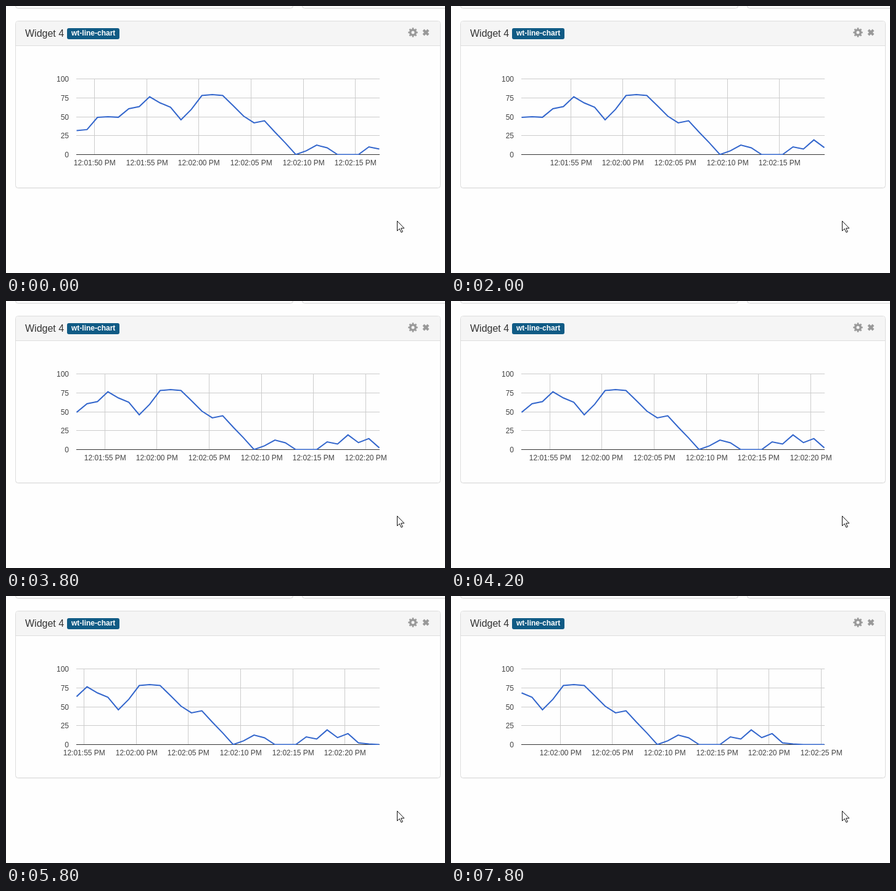
Write an HTML page that moves like this. It is 712x434 px and loops after 8000 ms.

```html
<!DOCTYPE html>
<html lang="en">
<head>
<meta charset="utf-8">
<title>Line chart widget</title>
<style>
  html, body { margin: 0; width: 100%; height: 100%; overflow: hidden; background: #fefefe; }
  svg { display: block; width: 712px; height: 434px; font-family: "Liberation Sans", Arial, sans-serif; }
  .card { fill: #fefefe; stroke: #ddd; }
  .shadow { fill: none; stroke: #000; stroke-opacity: .05; }
  .grid { stroke: #ccc; }
  .tick { font-size: 12px; fill: #444; }
  .icon { fill: none; stroke: #999; }
</style>
</head>
<body>
<svg viewBox="0 0 712 434">
  <clipPath id="plot"><rect x="114" y="118" width="492" height="124"/></clipPath>

  <!-- Cards -->
  <rect class="shadow" x="15.5" y="-39.5" width="450" height="44" rx="4"/>
  <rect class="card" x="15.5" y="-40.5" width="450" height="44" rx="4"/>
  <rect class="shadow" x="480.5" y="-39.5" width="450" height="44" rx="4"/>
  <rect class="card" x="480.5" y="-40.5" width="450" height="44" rx="4"/>
  <rect class="shadow" x="15.5" y="25.5" width="689" height="271" rx="4"/>
  <rect class="card" x="15.5" y="24.5" width="689" height="271" rx="4"/>
  <path d="M16 64V28a3 3 0 0 1 3-3H701a3 3 0 0 1 3 3V64z" fill="#f5f5f5"/>
  <path d="M16 64.5H704" stroke="#ddd"/>

  <!-- Header -->
  <text x="31" y="50" font-size="16" fill="#333">Widget 4</text>
  <rect x="99" y="36" width="85" height="18" rx="3" fill="#105b85"/>
  <text x="106" y="48" font-size="12" font-weight="bold" fill="#fff">wt-line-chart</text>
  <g class="icon">
    <circle cx="660" cy="43" r="4.3" stroke-width="3.6"/>
    <circle cx="660" cy="43" r="6.6" stroke-width="2.2" pathLength="16" stroke-dasharray="1 1" stroke-dashoffset=".5"/>
    <path d="M677 39l8 8m0-8l-8 8" stroke-width="4"/>
  </g>

  <!-- Chart -->
  <g id="rows"></g>
  <g id="columns"></g>
  <path d="M114 241.5H606" stroke="#333"/>
  <polyline id="series" clip-path="url(#plot)" fill="none" stroke="#3366cc" stroke-width="2"/>

  <!-- Pointer -->
  <path d="M634.5 349.5V365.5L638.2 362L641 368L643.3 367L640.7 361.2H645.8z" fill="#fff" stroke="#111"/>
</svg>
<script>
const LEFT = 114, RIGHT = 606, BASE = 241.5, HEIGHT = 123;
const SECOND = 16.93;        // pixels per second
const VISIBLE = 30;          // points in the window
const FIRST_TICK = 143.4;    // x of 12:01:50 before scrolling
const LOOP = 8000;

const values = [
  31.7, 33, 49.2, 50, 49.3, 60.6, 63.4, 76.4, 68.3, 62.6,
  46, 59.8, 78, 79.2, 78, 64.6, 50.8, 41.9, 44.7, 29.7,
  15.4, 0, 5, 12.5, 9, 0, 0, 0, 10.2, 7.3,
  19.4, 9.2, 14.5, 2.3, .8, 0, 0, 0
];

const byId = id => document.getElementById(id);
const yOf = value => BASE - value / 100 * HEIGHT;
const snap = n => Math.floor(n) + .5;
const label = (x, y, anchor, text) =>
  `<text class="tick" x="${x}" y="${y}" text-anchor="${anchor}">${text}</text>`;

byId('rows').innerHTML = [0, 25, 50, 75, 100].map(value => {
  const y = snap(yOf(value));
  return `<path class="grid" d="M${LEFT} ${y}H${RIGHT}"/>` + label(102, y + 4, 'end', value);
}).join('');

function clock(seconds) {
  const total = 110 + seconds;
  const pad = n => String(n).padStart(2, '0');
  return `12:${pad(Math.floor(total / 60))}:${pad(total % 60)} PM`;
}

function drawStep(step) {
  let columns = '';
  for (let s = 0; s <= 35; s += 5) {
    const x = snap(FIRST_TICK + (s - step) * SECOND);
    if (x < LEFT || x > RIGHT) continue;
    columns += `<path class="grid" d="M${x} 118V241"/>` + label(x + .3, 259, 'middle', clock(s));
  }
  byId('columns').innerHTML = columns;
  byId('series').setAttribute('points', values.slice(step, step + VISIBLE)
    .map((value, i) => `${LEFT + .5 + i * SECOND},${yOf(value)}`).join(' '));
}

// A new reading arrives every second, first at 800 ms.
const start = performance.now();
let shown = -1;
function frame() {
  const time = (performance.now() - start) % LOOP;
  const step = Math.floor((time + 200) / 1000);
  if (step !== shown) drawStep(shown = step);
  requestAnimationFrame(frame);
}
frame();
</script>
</body>
</html>
```
